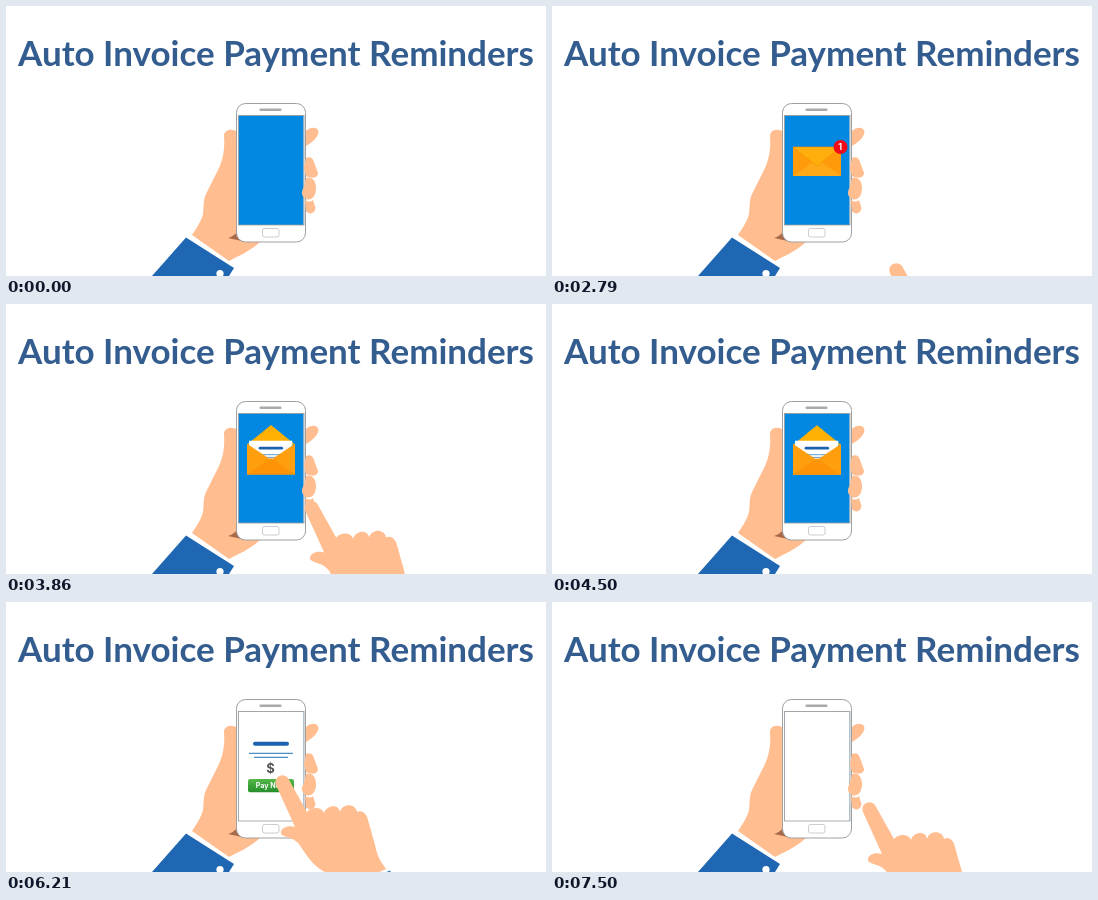
Recreate the animation shown at these times as an HTML page. Size 540 by 270 pixels, loop 8000 ms.

```html
<!DOCTYPE html>
<html lang="en">
<head>
<meta charset="utf-8">
<title>Auto Invoice Payment Reminders</title>
<style>
  html, body { margin: 0; width: 100%; height: 100%; overflow: hidden; background: #fff; }
  svg { display: block; width: 100%; height: 100%; }
  text { text-anchor: middle; font-weight: 700; }
  .title { font: 700 35px Lato, sans-serif; fill: #335c8f; }
  .label { font-family: Inter, "Open Sans", sans-serif; fill: #fff; }
  .skin { fill: #ffbd90; }
  .sleeve { fill: #2067b3; }
  .blue { fill: #1c62b0; }
</style>
</head>
<body>
<svg viewBox="0 0 540 270">
  <defs>
    <clipPath id="screenClip"><rect x="232.5" y="109.5" width="65" height="109.5"/></clipPath>
    <clipPath id="sheetClip"><rect class="sheet"/></clipPath>
    <linearGradient id="green" x2="0" y2="1">
      <stop stop-color="#55b848"/><stop offset="1" stop-color="#258f2c"/>
    </linearGradient>
  </defs>
  <rect width="540" height="270" fill="#fff"/>
  <text class="title" x="270" y="60">Auto Invoice Payment Reminders</text>

  <!-- holding hand -->
  <path class="skin" d="M231 126C227 122 218 123 218 130C219 143 217 154 212 164L200 188C197 194 198 201 197 208C195 216 190 223 186 229L223 255C232 250 243 246 254 236L240 200Z"/>
  <path d="M222 232Q229 230 232 224L236 235Z" fill="#a8694a"/>
  <path class="sleeve" d="M180 231.500L228 262L223 270H146Z"/>
  <circle cx="214" cy="267.500" r="3.600" fill="#fff"/>

  <!-- phone -->
  <rect x="230.500" y="97.500" width="69" height="138.500" rx="9" fill="#fff" stroke="#a0a0a0"/>
  <rect x="253.500" y="102.500" width="22" height="2.400" rx="1" fill="#aaa"/>
  <rect x="256.500" y="222.500" width="16.500" height="8.500" rx="2" fill="#fff" stroke="#ccc"/>
  <g clip-path="url(#screenClip)">
    <rect x="232" y="109" width="66" height="111" fill="#0288e0"/>
    <g id="mail">
      <path d="M241 141H289V170H241Z" fill="#ff9b0b"/>
      <path d="M241 170L265 153L289 170Z" fill="#ffa818"/>
      <path d="M241 141H289L265 160Z" fill="#ffae0c" stroke="#f39205" stroke-width=".6"/>
      <circle cx="288.500" cy="141" r="7" fill="#f20a18"/>
      <text class="label" x="288.300" y="144.300" font-size="9">1</text>
    </g>
    <g id="open">
      <path class="drop" d="M241 140.500L265 121L289 140.500Z" fill="#ffb000"/>
      <g clip-path="url(#sheetClip)">
        <rect class="sheet" fill="#fff"/>
        <g id="invoice">
          <rect class="blue" x="247" y="139.700" width="36" height="4" rx="2"/>
          <path d="M243 151.300H287M248 155.300H282" stroke="#4b8fc4" stroke-width="1.300"/>
          <text x="264.500" y="171" font-size="13" font-family="Inter, sans-serif" fill="#555">$</text>
          <g id="button">
            <rect x="242" y="177" width="46" height="13.300" rx="2" fill="url(#green)"/>
            <text class="label" x="265" y="186.300" font-size="7.200">Pay Now</text>
          </g>
        </g>
      </g>
      <g class="drop">
        <path d="M241 140L265 156L289 140V170.500H241Z" fill="#ff9f0e"/>
        <path d="M241 170.500L265 154L289 170.500Z" fill="#ff9307"/>
        <path d="M241 140L265 156L289 140" fill="none" stroke="#f8a21c" stroke-width=".6"/>
      </g>
    </g>
  </g>
  <rect x="232.500" y="109.500" width="65.500" height="109.500" fill="none" stroke="#999" stroke-width=".8"/>

  <!-- fingers around the right side -->
  <g class="skin">
    <path d="M300 125C305 120 312 121 312.500 126C312 132 305 137 300 140Z"/>
    <path d="M300 152C304 150 307 152 308 156L312 167C312 172 306 173 300 170L298 162Z"/>
    <path d="M300 172C305 170 310 174 310 182C310 191 305 195 300 193C295 190 295 186 298 181Z"/>
    <path d="M299 194Q304 197 307 194L309.500 202C309 208 303 209 300 205Z"/>
  </g>

  <!-- tapping hand -->
  <g id="hand">
    <path class="skin" d="M267 156C264 148 274 143 279 149L298 183C303 177 313 178 315 184C318 175 330 175 331 183C334 173 347 175 348 183C353 180 358 185 359 191L366 216C368 227 372 233 377 240L330 262C330 255 326 248 316 243C305 238 297 226 290 215C284 208 276 209 272 205C271 198 280 196 286 198Z"/>
    <path class="sleeve" d="M329 264L381 241.500L394 274L380 300H336Z"/>
    <circle cx="342" cy="268.500" r="3.600" fill="#fff"/>
  </g>
</svg>
<script>
const LOOP = 8000;
const $ = id => document.getElementById(id);
const all = selector => document.querySelectorAll(selector);

// Rows are [time, ...values]; values move linearly between rows.
function track(t, rows) {
  const next = rows.findIndex(row => row[0] > t);
  if (next === 0) return rows[0].slice(1);
  if (next < 0) return rows[rows.length - 1].slice(1);
  const a = rows[next - 1], b = rows[next];
  const k = (t - a[0]) / (b[0] - a[0]);
  return a.slice(1).map((v, i) => v + (b[i + 1] - v) * k);
}

const MAIL = [[1150, 0], [1320, 1], [3330, 1], [3440, .89], [3570, 1]];
const DROP = [[4500, 0], [5070, 84], [5190, 105]];
const SHEET = [ // x, y, width, height
  [4500, 243, 136.5, 43.5, 31], [5070, 241, 139, 48, 52], [5210, 232, 109, 66, 111]
];
const INVOICE = [[4500, .68, -5], [5070, .75, 0], [5210, 1, 0]]; // scale, shift
const FADE = [[6640, 1], [7490, 0]];
const BUTTON = [[6210, 1], [6300, .92], [6390, 1]];
const HAND = [
  [2789, 80, 126], [2790, 71, 111], [3330, 0, 0], [3600, 0, 0], [4250, 80, 126],
  [5610, 80, 126], [5640, 71, 111], [6070, 3, 27], [6210, 3, 27], [6300, 5, 29],
  [6390, 3, 27], [6640, 3, 27], [7430, 44, 54]
];

const put = (el, value) => el.setAttribute("transform", value);
const zoom = (el, s, x, y, dy = 0) =>
  put(el, `translate(${x} ${y + dy}) scale(${s}) translate(${-x} ${-y})`);

function draw(t) {
  const [mail] = track(t, MAIL);
  const opened = t >= 3610;
  $("mail").style.display = !opened && t >= 1180 ? "" : "none";
  $("open").style.display = opened ? "" : "none";
  zoom($("mail"), mail, 265, 155);

  const [drop] = track(t, DROP);
  all(".drop").forEach(el => put(el, `translate(0 ${drop})`));

  const box = track(t, SHEET);
  all(".sheet").forEach(el =>
    ["x", "y", "width", "height"].forEach((name, i) => el.setAttribute(name, box[i])));

  const [scale, shift] = track(t, INVOICE);
  zoom($("invoice"), scale, 264.5, 165, shift);
  $("invoice").setAttribute("opacity", track(t, FADE)[0]);
  zoom($("button"), track(t, BUTTON)[0], 265, 183.5);

  put($("hand"), `translate(${track(t, HAND).join(" ")})`);
}

const start = performance.now();
function tick() {
  draw((performance.now() - start) % LOOP);
  requestAnimationFrame(tick);
}
tick();
</script>
</body>
</html>
```
